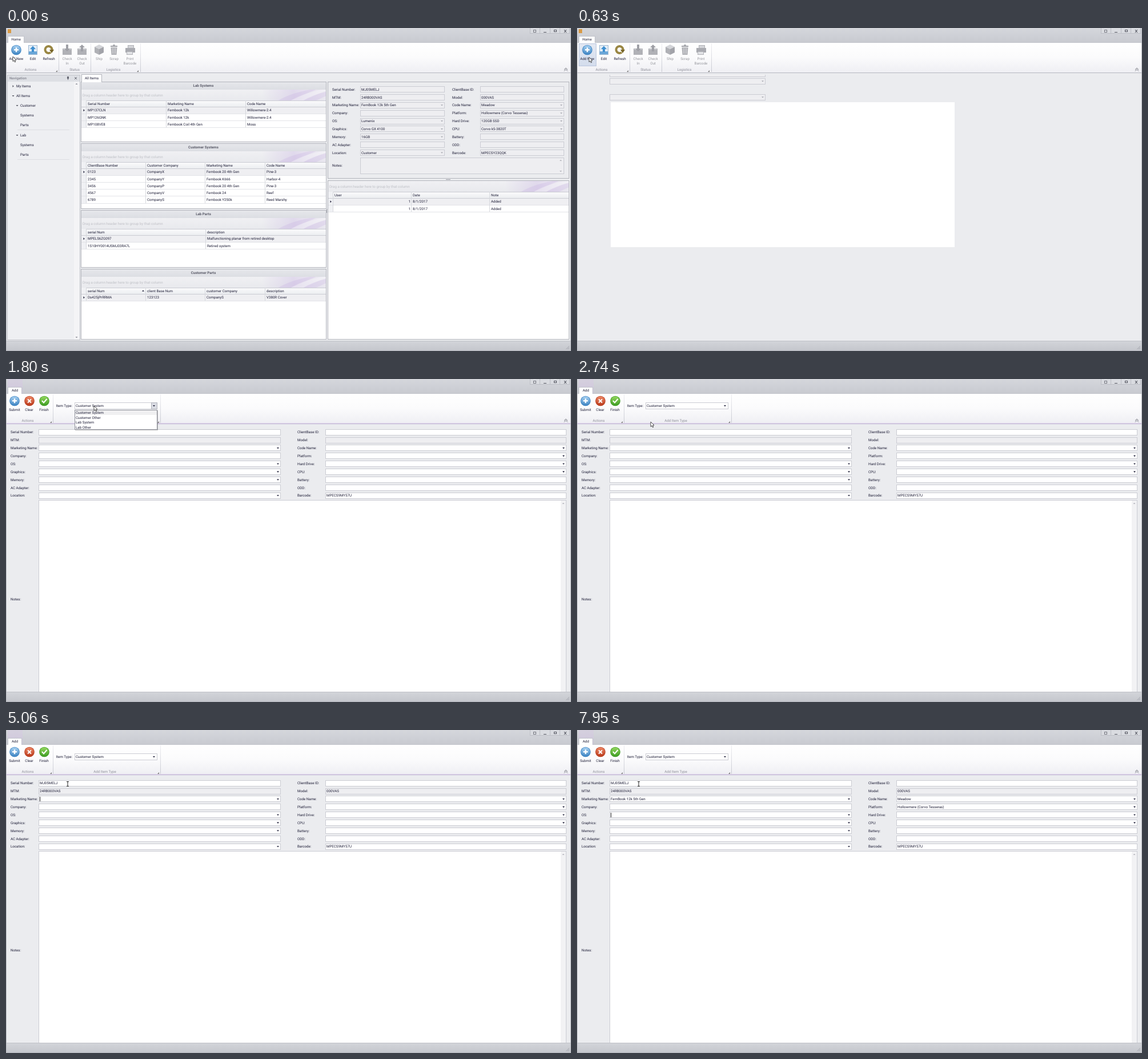
These frames come from a looping animation (989x566 px, 8000 ms). An HTML page with a canvas:

```html
<!DOCTYPE html>
<html lang="en">
<head>
<meta charset="utf-8">
<title>Inventory</title>
<style>
html, body { margin: 0; width: 100%; height: 100%; overflow: hidden; background: #ebecef; }
canvas { display: block; width: 989px; height: 566px; }
</style>
</head>
<body>
<canvas id="stage" width="989" height="566"></canvas>
<script>
const c = document.getElementById('stage').getContext('2d');
c.textRendering = 'geometricPrecision';
const LOOP = 8000;
const INK = '#1d1d36', LINE = '#cbccd3', EDGE = '#b3b5bc', PAGE = '#ebecef';

// ---------- drawing helpers ----------
function box(x, y, w, h, fill, line) {
  if (fill) { c.fillStyle = fill; c.fillRect(x, y, w, h); }
  if (line) { c.strokeStyle = line; c.lineWidth = 1; c.strokeRect(x + .5, y + .5, w - 1, h - 1); }
}
function fade(x0, y0, x1, y1, ...colors) {
  const g = c.createLinearGradient(x0, y0, x1, y1);
  colors.forEach((color, i) => g.addColorStop(i / (colors.length - 1), color));
  return g;
}
const vertical = (y0, y1, ...colors) => fade(0, y0, 0, y1, ...colors);
function text(s, x, y, color = INK, align = 'left', weight = 400) {
  c.font = `${weight} 6.2px Roboto, "Open Sans", sans-serif`;
  c.textAlign = align;
  c.fillStyle = color;
  c.fillText(s, x, y + 2.2);
}
function shape(color, points, stroke) {
  c.beginPath();
  points.forEach(([x, y]) => c.lineTo(x, y));
  if (stroke) {
    c.strokeStyle = color; c.lineWidth = stroke; c.stroke();
  } else {
    c.closePath(); c.fillStyle = color; c.fill();
  }
}
function disc(x, y, r, fill) {
  c.beginPath(); c.arc(x, y, r, 0, 7); c.fillStyle = fill; c.fill();
}
const down = (x, y, color = INK) => shape(color, [[x - 2, y - 1], [x + 2, y - 1], [x, y + 1.3]]);
const up = (x, y, color = INK) => shape(color, [[x - 2, y + 1], [x + 2, y + 1], [x, y - 1.3]]);
const right = (x, y, color = INK) => shape(color, [[x - 1, y - 2], [x + 1.3, y], [x - 1, y + 2]]);
const launcher = x => shape('#777', [[x + 1, 74], [x + 1, 77], [x - 2, 77]]);

// ---------- window ----------
function windowFrame() {
  box(0, 0, 989, 566, PAGE);
  box(0, 0, 989, 26, vertical(0, 26, '#d5d7dc', '#c8cad0'));
  box(3, 2, 6, 7, '#d99a45');
  box(917, -1, 70, 11, '#d9dbe0', '#bcbec5');
  [934, 952, 969].forEach(x => box(x, 0, 1, 10, '#bcbec5'));
  box(923, 3, 5, 5, null, '#777982');
  box(941, 7, 5, 1, '#555761');
  box(959, 3, 5, 4, null, '#555761');
  shape('#555761', [[977, 3], [981, 8]], 1.1);
  shape('#555761', [[981, 3], [977, 8]], 1.1);
}
function windowEdge() {
  box(0, 549, 989, 17, vertical(549, 566, '#d2d4d9', '#c4c6cc'));
  box(0, 548, 989, 1, '#bfc1c7');
  for (let i = 0; i < 3; i++) shape('#9fa1a9', [[980 + i * 2, 563], [986, 557 + i * 2]], .7);
  box(0, -1, 989, 567, null, EDGE);
}
function ribbon(bottomLine) {
  box(1, 25, 987, 54, vertical(25, 79, '#ffffff', '#fbfbfc', '#eeeef3'));
  box(1, 25, 987, 1, '#c2c4cb');
  box(1, 78, 987, 1, bottomLine);
  shape('#777982', [[977, 73], [980, 70], [983, 73]], 1);
  shape('#777982', [[977, 75.5], [980, 72.5], [983, 75.5]], 1);
}
const separator = x => box(x, 27, 1, 50, vertical(27, 77, '#eeeef2', '#c6c8d0'));
const groupTitle = (s, x) => text(s, x, 73, '#8d8e98', 'center');
const hoverBox = w => box(3, 27, w, 40, vertical(27, 67, '#e4e9f3', '#d3dcec'), '#bac6dd');
function tab(label, w, alpha = 1) {
  c.globalAlpha = alpha;
  box(3, 14, w, 13, '#fff');
  box(3, 14, w, 1, '#c2c4cb');
  box(3, 14, 1, 12, '#c2c4cb');
  box(2 + w, 14, 1, 12, '#c2c4cb');
  text(label, 3 + w / 2, 20, INK, 'center');
  c.globalAlpha = 1;
}

// ---------- icons ----------
function badge(x, light, dark) {
  disc(x, 38.5, 8.8, dark);
  disc(x, 38.2, 7.8, vertical(30, 47, light, dark));
}
function plusIcon(x) {
  badge(x, '#a9d2f2', '#3c83c2');
  box(x - 4, 37, 8, 2.5, '#fff');
  box(x - 1.25, 34.2, 2.5, 8, '#fff');
}
function crossIcon(x) {
  badge(x, '#ee8a68', '#b93a1b');
  shape('#fff', [[x - 3, 35.5], [x + 3, 41.5]], 2.2);
  shape('#fff', [[x + 3, 35.5], [x - 3, 41.5]], 2.2);
}
function checkIcon(x) {
  badge(x, '#96d85f', '#3d9c22');
  shape('#fff', [[x - 4, 38], [x - 1, 41.5], [x + 4.5, 35]], 2);
}
function editIcon(x) {
  box(x - 8, 30, 16, 17, '#e3edf6', '#9cb6d0');
  box(x - 7, 41, 14, 5, '#6ba7d8');
  shape('#3f8fd0', [[x, 31.5], [x + 5, 37], [x + 2, 37], [x + 2, 42], [x - 2, 42], [x - 2, 37], [x - 5, 37]]);
}
function refreshIcon(x) {
  c.beginPath(); c.arc(x - .5, 38, 6, .9, 6.6);
  c.strokeStyle = '#9a8744'; c.lineWidth = 4; c.stroke();
  shape('#766426', [[x + 1, 38], [x + 9, 38], [x + 5, 44]]);
}
const GREY = '#b0b1b6', PALE = '#d3d4d8';
function trayIcon(x, out) {
  box(x - 8, 36, 16, 11, PALE, GREY);
  box(x - 7, 38, 14, 8, GREY);
  const tip = out ? 29 : 41, base = out ? 34 : 36;
  box(x - 2, out ? 33 : 29, 4, 8, '#9fa0a6');
  shape('#9fa0a6', [[x - 5, base], [x + 5, base], [x, tip]]);
}
function crateIcon(x) {
  shape(PALE, [[x, 29], [x + 8, 33], [x, 37], [x - 8, 33]]);
  shape(GREY, [[x - 8, 33], [x, 37], [x, 47], [x - 8, 43]]);
  shape('#a2a3a9', [[x, 37], [x + 8, 33], [x + 8, 43], [x, 47]]);
}
function binIcon(x) {
  box(x - 6, 31, 12, 2, '#a2a3a9');
  box(x - 2, 29, 4, 2, GREY);
  shape(GREY, [[x - 5.5, 34], [x + 5.5, 34], [x + 4.5, 47], [x - 4.5, 47]]);
  [-2.5, 0, 2.5].forEach(d => box(x + d - .4, 35, .8, 10, '#dddde1'));
}
function printerIcon(x) {
  box(x - 4, 30, 11, 6, PALE, GREY);
  box(x - 8, 35, 17, 8, '#a9aab0');
  box(x - 6, 41, 11, 6, '#e2e3e6', GREY);
}

function homeRibbon(hover) {
  ribbon('#b6b8c0');
  tab('Home', 29);
  if (hover) hoverBox(31);
  [92, 148, 235].forEach(separator);
  plusIcon(18); editIcon(47); refreshIcon(75);
  trayIcon(107); trayIcon(133, true);
  crateIcon(163); binIcon(189); printerIcon(217);
  [['Add New', 18], ['Edit', 47], ['Refresh', 75]].forEach(([s, x]) => text(s, x, 54, INK, 'center'));
  [['Check', 107, 'In'], ['Check', 133, 'Out'], ['Ship', 163, ''], ['Scrap', 189, ''], ['Print', 217, 'Barcode']]
    .forEach(([a, x, b]) => { text(a, x, 54, '#96979d', 'center'); text(b, x, 61.5, '#96979d', 'center'); });
  groupTitle('Actions', 43); groupTitle('Status', 120); groupTitle('Logistics', 188);
  launcher(89); launcher(231);
}

function addRibbon(hover, tabAlpha, open) {
  box(3, 0, 26, 26, vertical(0, 26, '#d5d0de', '#cfc6dc'));
  ribbon('#b8a9cf');
  box(1, 76, 987, 2, '#eae5f1');
  if (tabAlpha) tab('Add', 25, tabAlpha);
  if (hover) hoverBox(24);
  [82, 270].forEach(separator);
  plusIcon(15); crossIcon(41); checkIcon(67);
  [['Submit', 15], ['Clear', 40.5], ['Finish', 66.5]].forEach(([s, x]) => text(s, x, 54, INK, 'center'));
  groupTitle('Actions', 38); groupTitle('Add Item Type', 173);
  launcher(79); launcher(267);
  text('Item Type:', 87.5, 47);
  box(120, 41, 145, 12, '#fff', LINE);
  if (open) box(254, 41, 11, 12, '#d9dbe2', EDGE);
  down(259, 47);
  text('Customer System', 122, 47);
}
function itemTypeList() {
  box(121, 55, 145, 35, 'rgba(0,0,0,.25)');
  box(120, 54, 145, 35, '#fff', '#8f919a');
  box(121, 55, 143, 8, '#f0f0f1');
  ['Customer System', 'Customer Other', 'Lab System', 'Lab Other']
    .forEach((s, i) => text(s, 122, 58.7 + i * 8.6));
}

// ---------- item form ----------
const LABELS = [
  ['Serial Number', 'ClientBase ID'], ['MTM', 'Model'], ['Marketing Name', 'Code Name'],
  ['Company', 'Platform'], ['OS', 'Hard Drive'], ['Graphics', 'CPU'],
  ['Memory', 'Battery'], ['AC Adapter', 'ODD'], ['Location', 'Barcode']
];
const COMBOS = [[2, 4, 5, 6, 8], [2, 3, 4, 5]];
const rowY = (top, row) => top + row * 13.88;

function field(x, y, w, { locked, combo, faint }) {
  box(x, Math.round(y - 5.5), w, 11, locked ? '#eeeef1' : '#fff', LINE);
  if (combo) down(x + w - 5, y, faint ? '#a9aab2' : INK);
}
function itemForm({ labelX, fieldX, width, top, locked }, values) {
  LABELS.forEach((pair, row) => pair.forEach((label, col) => {
    const y = rowY(top, row);
    text(label + ':', labelX[col], y);
    field(fieldX[col], y, width[col], {
      locked: locked || row === 1, combo: COMBOS[col].includes(row), faint: locked
    });
    text(values[row][col], fieldX[col] + 2, y);
  }));
}

// ---------- overview page ----------
const OVERVIEW = { labelX: [571, 781], fieldX: [620, 830], width: [148, 147], top: 107.5, locked: true };
const SELECTED = [
  ['MJ05MELJ', ''], ['24RB000VAS', '000VAS'], ['FernBook 12k 5th Gen', 'Meadow'],
  ['', 'Hollowmere (Corvo Tesseras)'], ['Lumenix', '120GB SSD'], ['Corvo GX 4100', 'Corvo k5-3820T'],
  ['16GB', ''], ['', ''], ['Customer', 'MPECSY23QQK']
];

function groupPanel(x, y, w) {
  box(x, y, w, 20, vertical(y, y + 20, '#f0f0f3', '#e8e9ed'));
  c.save();
  c.beginPath(); c.rect(x, y, w, 19); c.clip();
  const r = x + w;
  box(r - 110, y, 110, 20, fade(r - 110, y + 20, r, y, 'rgba(210,195,230,0)', 'rgba(210,195,230,.5)', 'rgba(232,226,241,.3)'));
  for (let i = 0; i < 3; i++) {
    const s = r - 85 + i * 22;
    c.beginPath();
    c.moveTo(s, y + 20);
    c.quadraticCurveTo(s + 25, y + 4, s + 75, y - 3);
    c.quadraticCurveTo(s + 45, y + 9, s + 22, y + 20);
    c.fillStyle = i === 1 ? 'rgba(255,255,255,.25)' : 'rgba(183,153,218,.2)';
    c.fill();
  }
  c.restore();
  text('Drag a column header here to group by that column', x + 2, y + 10, '#bfc0c6');
}
function grid({ title, x = 132, top, w = 428, bottom, cols, heads, rows, numeric }) {
  box(x, top, w, bottom - top, '#fff');
  if (title) {
    box(x, top, w, 13, vertical(top, top + 13, '#e6e7eb', '#dcdee3'));
    text(title, x + w / 2 - .5, top + 5.8, '#5a5b68', 'center', 700);
  }
  const panel = title ? top + 13 : top;
  groupPanel(x, panel, w);
  const head = panel + 19;
  const rowLine = n => Math.round(head + 11 + n * 12.1);
  const end = rowLine(rows.length);
  box(x, head, w, 11, vertical(head, head + 11, '#fbfbfc', '#eceef1'));
  box(x, head, w, 1, LINE);
  box(x, head + 12, w, 11, '#efeff2');
  box(x, head, 9, end - head, '#f0f1f4');
  box(x, head + 11, w, 1, LINE);
  rows.forEach((_, i) => box(x, rowLine(i + 1), w, 1, '#e3e4e8'));
  right(x + 4.5, head + 17.2);
  cols.forEach((cx, i) => {
    box(cx - 1, head, 1, end - head, '#d6d8dd');
    text(heads[i], cx + 2, head + 5.3);
    rows.forEach((row, n) => {
      const y = head + 17.2 + n * 12.1;
      if (numeric && i === 0) text(row[i], cols[1] - 2, y, INK, 'right');
      else text(row[i], cx + 2, y);
    });
  });
  box(x - 1, top - 1, w + 2, bottom - top + 1, null, EDGE);
}
const GRIDS = [
  { title: 'Lab Systems', top: 95, bottom: 200, cols: [141, 281, 420],
    heads: ['Serial Number', 'Marketing Name', 'Code Name'],
    rows: [['MP137CLN', 'Fernbook 12k', 'Willowmere-2.4'], ['MP126GNK', 'Fernbook 12k', 'Willowmere-2.4'],
           ['MP108VE8', 'Fernbook Coil 4th Gen', 'Moss']] },
  { title: 'Customer Systems', top: 203, bottom: 317, cols: [141, 245, 349, 454],
    heads: ['ClientBase Number', 'Customer Company', 'Marketing Name', 'Code Name'],
    rows: [['0123', 'CompanyX', 'Fernbook 20 4th Gen', 'Pine-3'], ['2345', 'CompanyY', 'Fernbook K666', 'Harbor-4'],
           ['3456', 'CompanyP', 'Fernbook 20 4th Gen', 'Pine-3'], ['4567', 'CompanyV', 'Fernbook 24', 'Reef'],
           ['6789', 'CompanyS', 'Fernbook Y250k', 'Reed Marshy']] },
  { title: 'Lab Parts', top: 320, bottom: 420, cols: [141, 350],
    heads: ['serial Num', 'description'],
    rows: [['MPELS6ZG097', 'Malfunctioning planar from retired desktop'], ['1S10HY0014USMJ03RA7L', 'Retired system']] },
  { title: 'Customer Parts', top: 423, bottom: 546, cols: [141, 245, 349, 454],
    heads: ['serial Num', 'client Base Num', 'customer Company', 'description'],
    rows: [['Ds425jPrRRMA', '123123', 'CompanyS', 'V380R Cover']] },
  { x: 564, w: 421, top: 268, bottom: 546, cols: [573, 710, 847], numeric: true,
    heads: ['User', 'Date', 'Note'], rows: [['1', '8/1/2017', 'Added'], ['1', '8/1/2017', 'Added']] }
];
const TREE = [
  ['My Items', 18, 102, right], ['All Items', 18, 119, down], ['Customer', 25, 136, down], ['Systems', 25, 153],
  ['Parts', 25, 169.5], ['Lab', 25, 188, down], ['Systems', 25, 205], ['Parts', 25, 222]
];
function overviewPage() {
  box(2, 82, 128, 465, '#eeeff2', '#c2c4ca');
  box(3, 83, 126, 11, '#dddfe4');
  text('Navigation', 6, 88, '#8f909a', 'left', 700);
  box(107, 85, 3, 4, '#666873'); box(108, 89, 1, 2, '#666873');
  shape('#666873', [[120, 86], [124, 90]], 1);
  shape('#666873', [[124, 86], [120, 90]], 1);
  box(119, 94, 9, 452, '#f4f4f6');
  up(123.5, 98, '#92939c'); down(123.5, 542, '#92939c');
  TREE.forEach(([s, x, y, arrow]) => { text(s, x, y); if (arrow) arrow(x - 5.5, y, '#555761'); });
  [178, 230].forEach(y => box(20, y, 91, 1, '#dddee3'));

  box(132, 81, 36, 14, '#fff', EDGE);
  GRIDS.forEach(grid);
  box(133, 94, 34, 1, '#fff');
  text('All Items', 150, 87.5, INK, 'center');
  up(240, 460.5);
  box(563, 94, 423, 170, null, EDGE);
  itemForm(OVERVIEW, SELECTED);
  text('Notes:', 571, 241);
  box(620, 227, 357, 29, '#eeeef1', LINE);
  up(971, 232, '#b5b6bd'); down(971, 251, '#b5b6bd');
  box(770, 265, 8, 1, '#999ba4');
  box(561, 317, 1, 7, '#999ba4');
}

// ---------- add page ----------
const ADD = { labelX: [8, 510], fieldX: [57, 559], width: [424, 422], top: 93.2 };
// [time, row, column, text]
const ENTRIES = [
  [0, 8, 1, 'MPECS9MY57U'],
  [3520, 0, 0, '1S24RB000VASMJ05MELJ'], [3830, 0, 0, 'MJ05MELJ'], [3830, 1, 0, '24RB000VAS'], [3830, 1, 1, '000VAS'],
  [5620, 2, 0, 'Fernbook 20'], [5620, 2, 1, 'Elm'],
  [5770, 2, 0, 'Fernbook 20 4th Gen'], [5770, 2, 1, 'Pine-3'],
  [5920, 2, 0, 'Fernbook 12k'], [5920, 2, 1, 'Willowmere-2.4'],
  [6090, 2, 0, 'Fernbook 12k (Lantern)'], [6090, 2, 1, 'Willowmere-2'],
  [6550, 2, 0, 'FernBook 12k 5th Gen'], [6550, 2, 1, 'Meadow'],
  [7780, 3, 1, 'Hollowmere (Corvo Tesseras)']
];
// [time, row, column, caret place]
const FOCUS = [
  [0], [3210, 0, 0, 'start'], [3520, 0, 0, 'end'], [3690], [3830, 0, 0, 'start'], [4380, 0, 1, 'start'],
  [4530, 1, 0, 'all'], [4830, 1, 1, 'all'], [5060, 2, 0, 'start'], [5370], [5620, 2, 0, 'start'], [6390],
  [7020, 2, 1, 'all'], [7480, 3, 0, 'start'], [7710, 3, 1, 'start'], [7950, 4, 0, 'start']
];
function addPage(t) {
  const values = LABELS.map(() => ['', '']);
  ENTRIES.forEach(([time, row, col, s]) => { if (t >= time) values[row][col] = s; });
  itemForm(ADD, values);
  text('Notes:', 8, 386);
  box(57, 212, 924, 340, '#fff', LINE);
  box(971, 213, 9, 336, '#f2f2f4');
  up(975.5, 218, '#b5b6bd');

  const [, row, col, place] = FOCUS.filter(f => t >= f[0]).pop();
  if (!place) return;
  const x = ADD.fieldX[col] + 2, y = rowY(ADD.top, row), value = values[row][col];
  const width = c.measureText(value).width;
  if (place === 'all') {
    box(x, Math.round(y - 4), width + .5, 8, '#3399ff');
    text(value, x, y, '#fff');
  } else {
    box(place === 'end' ? Math.round(x + width) : x, Math.round(y - 4), 1, 8, '#222');
  }
}
function loadingPage() {
  field(57, 80, 273, { locked: true });
  box(57, 79, 273, 3, PAGE);
  [93.2, 121.2].forEach(y => field(57, y, 273, { locked: true, combo: true, faint: true }));
  box(59, 130, 602, 254, '#fff');
}

// ---------- pointer ----------
// [start, steps, x, y]: each leg moves in steps of 78 ms
const LEGS = [[90, 2, 21, 51], [1180, 5, 154, 47], [2270, 2, 150, 56], [2505, 8, 108, 94]];
function pointerAt(t) {
  let x = 12, y = 50;
  for (const [start, steps, toX, toY] of LEGS) {
    if (t < start) break;
    const k = Math.min(1, (Math.floor((t - start) / 78) + 1) / steps);
    x += (toX - x) * k;
    y += (toY - y) * k;
  }
  return [x, y];
}
function pointer(t) {
  const [x, y] = pointerAt(t);
  if (y > 88) {
    box(x - .5, y - 4, 1, 9, '#222');
    box(x - 2, y - 4, 4, 1, '#222');
    box(x - 2, y + 4, 4, 1, '#222');
    return;
  }
  const arrow = [[0, 0], [0, 8.5], [2, 6.8], [3.4, 9.8], [4.8, 9.2], [3.5, 6.2], [6, 6], [0, 0]].map(([a, b]) => [x + a, y + b]);
  shape('#fff', arrow);
  shape('#222', arrow, .8);
}

function draw(t) {
  windowFrame();
  if (t < 720) {
    if (t < 630) {
      overviewPage();
      c.globalAlpha = t < 480 ? 0 : t < 560 ? .5 : .92;
      box(1, 79, 987, 470, PAGE);
      c.globalAlpha = 1;
    } else {
      loadingPage();
    }
    homeRibbon(t >= 330);
  } else {
    const open = t >= 1650 && t < 2430;
    addPage(t);
    const tabAlpha = t < 880 ? 0 : Math.min(1, (Math.floor((t - 880) / 77) + 1) / 4);
    addRibbon(t < 1260, tabAlpha, open);
    if (open) itemTypeList();
  }
  windowEdge();
  pointer(t);
}

const begin = performance.now();
function tick() {
  draw((performance.now() - begin) % LOOP);
  requestAnimationFrame(tick);
}
tick();
</script>
</body>
</html>
```
